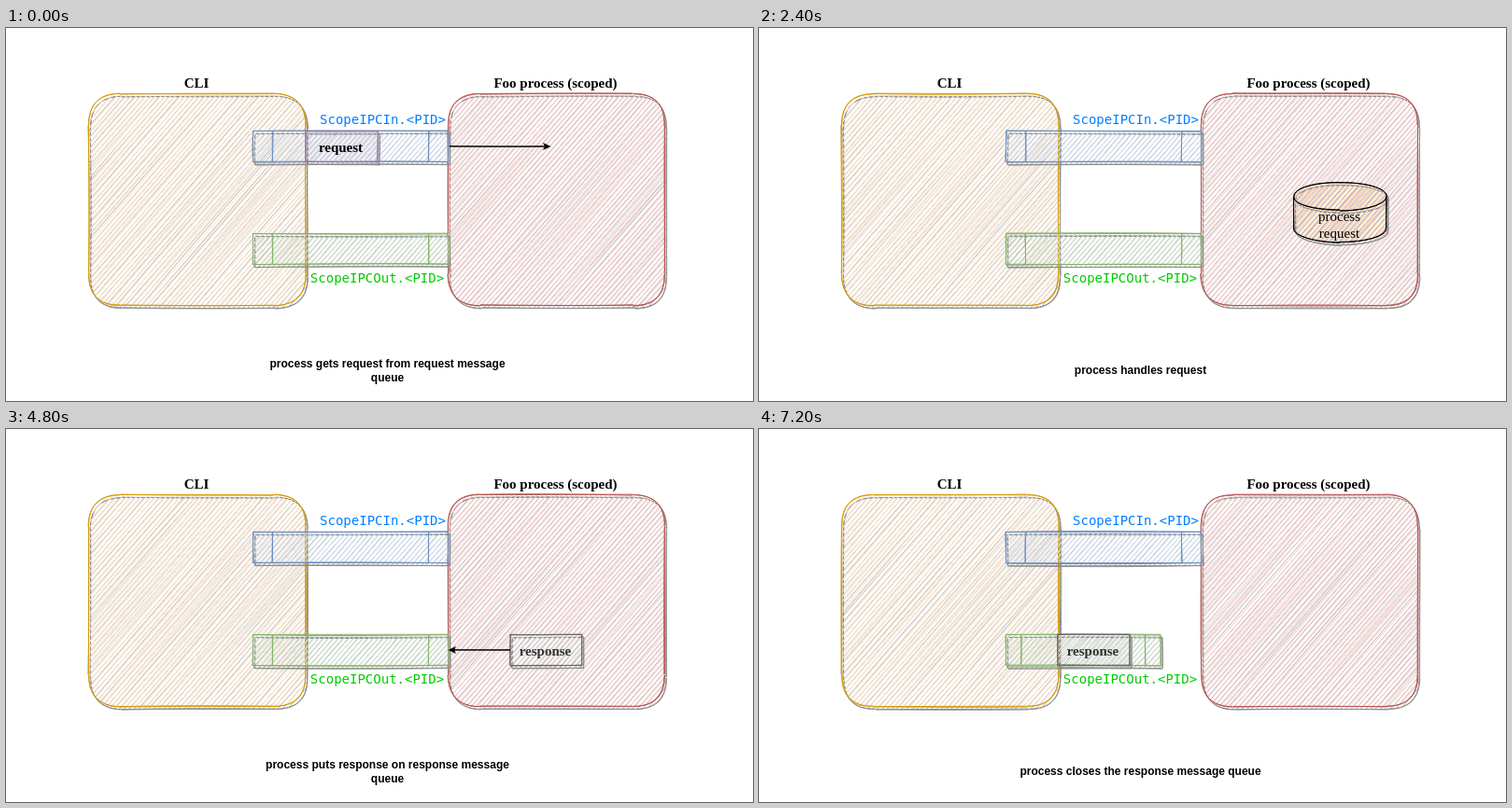
Animation of 800 by 400 pixels, one loop 8 s. Source, as an HTML page with a canvas:

```html
<!DOCTYPE html>
<html lang="en">
<head>
<meta charset="utf-8">
<title>Request and response queues</title>
<style>
  html, body { margin: 0; width: 800px; height: 400px; overflow: hidden; background: #fff; }
  canvas { display: block; }
</style>
</head>
<body>
<canvas width="800" height="400"></canvas>
<script>
const ctx = document.querySelector('canvas').getContext('2d');
const STEP = 1200, LOOP = 8000;
const SERIF = '"Liberation Serif", serif', BOLD = 'bold 15px ' + SERIF;
const MONO = '14px "DejaVu Sans Mono", monospace';
const SANS = 'bold 12px "Liberation Sans", sans-serif';
const HATCH_ANGLE = 49 * Math.PI / 180, HATCH_GAP = 4;

const ORANGE = ['#d79b00', '#ffe6cc'], RED = ['#b85450', '#f8cecc'];
const BLUE = ['#6c8ebf', '#dae8fc'], GREEN = ['#82b366', '#d5e8d4'];
const PURPLE = ['#9673a6', '#e1d5e7'], GREY = ['#666666', '#f5f5f5'];
const BLACK = ['#000000', '#ffcc99'], SHADOW = ['#8c8c8c', '#a0a0a0'];

let seed = 1;
function random() {
  seed = (seed + 0x6D2B79F5) | 0;
  let t = Math.imul(seed ^ seed >>> 15, 1 | seed);
  t = t + Math.imul(t ^ t >>> 7, 61 | t) ^ t;
  return ((t ^ t >>> 14) >>> 0) / 4294967296;
}
const jitter = amount => (random() * 2 - 1) * amount;

// A segment is a cubic curve: start, two control points, end.
const line = (x1, y1, x2, y2) => [x1, y1, x1 + (x2 - x1) * .3, y1 + (y2 - y1) * .3,
  x1 + (x2 - x1) * .6, y1 + (y2 - y1) * .6, x2, y2];
const corner = (x1, y1, cx, cy, x2, y2, k) => [x1, y1, x1 + (cx - x1) * k, y1 + (cy - y1) * k,
  x2 + (cx - x2) * k, y2 + (cy - y2) * k, x2, y2];

// Two slightly different hand-drawn passes over one segment.
function scribble(path, s, amount = .7) {
  const dx = s[6] - s[0], dy = s[7] - s[1];
  for (const a of [amount, amount / 2]) {
    const bow = jitter(1.3 * amount) / 200;
    const p = s.map((v, i) => v + jitter(a) + (i > 1 && i < 6 ? bow * (i % 2 ? -dx : dy) : 0));
    path.moveTo(p[0], p[1]);
    path.bezierCurveTo(...p.slice(2));
  }
}

function sketch(segments) {
  const path = new Path2D();
  segments.forEach(s => scribble(path, s));
  return path;
}

function hatch(x, y, w, h) {
  const path = new Path2D(), run = h / Math.tan(HATCH_ANGLE);
  for (let p = x - run; p < x + w; p += HATCH_GAP / Math.sin(HATCH_ANGLE))
    scribble(path, line(p, y + h, p + run, y), .8);
  return path;
}

function paint(outline, hatching, area, [stroke, fill], fillWeight) {
  ctx.save();
  ctx.clip(area);
  ctx.lineWidth = fillWeight;
  ctx.strokeStyle = fill;
  ctx.stroke(hatching);
  ctx.restore();
  ctx.lineWidth = 1;
  ctx.strokeStyle = stroke;
  ctx.stroke(outline);
}

function shape(segments, area, bounds, colors) {
  const outline = sketch(segments), hatching = hatch(...bounds);
  ctx.save();
  ctx.translate(2, 3);
  paint(outline, hatching, area, SHADOW, .5);
  ctx.restore();
  paint(outline, hatching, area, colors, .9);
}

function box(x, y, w, h, colors) {
  const r = x + w, b = y + h, area = new Path2D();
  area.rect(x, y, w, h);
  shape([line(x, y, r, y), line(r, y, r, b), line(r, b, x, b), line(x, b, x, y)],
    area, [x, y, w, h], colors);
}

function pipe(y, w, colors) {
  const x = 264.5, h = 33;
  box(x, y, w, h, colors);
  ctx.stroke(sketch([.1, .9].map(f => line(x + w * f, y, x + w * f, y + h))));
}

function roundBox(x, y, w, h, colors) {
  const r = x + w, b = y + h, c = 34, k = 2 / 3, area = new Path2D();
  area.roundRect(x, y, w, h, c * .85);
  shape([
    line(x + c, y, r - c, y), corner(r - c, y, r, y, r, y + c, k),
    line(r, y + c, r, b - c), corner(r, b - c, r, b, r - c, b, k),
    line(r - c, b, x + c, b), corner(x + c, b, x, b, x, b - c, k),
    line(x, b - c, x, y + c), corner(x, y + c, x, y, x + c, y, k)
  ], area, [x, y, w, h], colors);
}

function cylinder(x, y, w, h, ry, colors) {
  const r = x + w, m = x + w / 2, top = y + ry, low = y + h - ry, k = .5523;
  const area = new Path2D();
  area.ellipse(m, top, w / 2, ry, 0, Math.PI, 0);
  area.ellipse(m, low, w / 2, ry, 0, 0, Math.PI);
  const bowl = at => [corner(x, at, x, at + ry, m, at + ry, k), corner(m, at + ry, r, at + ry, r, at, k)];
  shape([
    corner(x, top, x, y, m, y, k), corner(m, y, r, y, r, top, k),
    ...bowl(top), ...bowl(low), line(x, top, x, low), line(r, top, r, low)
  ], area, [x, y, w, h], colors);
}

function arrow(from, to, y) {
  const d = Math.sign(to - from), path = new Path2D();
  scribble(path, line(from, y, to - d * 6, y), .3);
  ctx.strokeStyle = ctx.fillStyle = '#000';
  ctx.lineWidth = 1;
  ctx.stroke(path);
  ctx.beginPath();
  ctx.moveTo(to, y);
  ctx.lineTo(to - d * 8.5, y - 4);
  ctx.lineTo(to - d * 6.5, y);
  ctx.lineTo(to - d * 8.5, y + 4);
  ctx.fill();
}

function text(str, x, y, font, color = '#000') {
  ctx.font = font;
  ctx.fillStyle = color;
  ctx.textAlign = 'center';
  ctx.fillText(str, x, y);
}

function caption(...lines) {
  const first = lines.length > 1 ? 364 : 371;
  lines.forEach((s, i) => text(s, 408.5, first + i * 15, SANS));
}

function request(x) {
  box(x, 110.5, 77, 33, PURPLE);
  text('request', x + 37.5, 133, BOLD);
}

function response(x) {
  box(x, 220.5, 77, 33, GREY);
  text('response', x + 37.5, 243, BOLD, '#333');
}

const steps = [
  () => {
    request(321);
    arrow(475, 583.5, 127);
    caption('process gets request from request message', 'queue');
  },
  () => request(584),
  () => {
    cylinder(572.5, 165.5, 99.5, 64.5, 15, BLACK);
    text('process', 621.5, 207, '15px ' + SERIF);
    text('request', 621.5, 225, '15px ' + SERIF);
    caption('process handles request');
  },
  () => {
    response(540);
    caption('process prepares response');
  },
  () => {
    response(540);
    arrow(540, 473.5, 237);
    caption('process puts response on response message', 'queue');
  },
  () => response(320),
  () => {
    response(320);
    caption('process closes the response message queue');
  }
];

function draw(step) {
  seed = 97 + step * 1013;
  ctx.fillStyle = '#fff';
  ctx.fillRect(0, 0, 800, 400);
  roundBox(88.5, 70.5, 232.5, 227, ORANGE);
  roundBox(473.5, 70.5, 232, 227, RED);
  pipe(110.5, 209, BLUE);
  pipe(220.5, step === 6 ? 165.5 : 209, GREEN);
  text('CLI', 204, 64, BOLD);
  text('Foo process (scoped)', 588.5, 64, BOLD);
  text('ScopeIPCIn.<PID>', 403.5, 103, MONO, '#007fff');
  text('ScopeIPCOut.<PID>', 397.5, 273, MONO, '#00cc00');
  steps[step]();
}

let shown = -1;
function tick() {
  const step = Math.floor(performance.now() % LOOP / STEP);
  if (step !== shown) draw(shown = step);
  requestAnimationFrame(tick);
}
tick();
</script>
</body>
</html>
```
